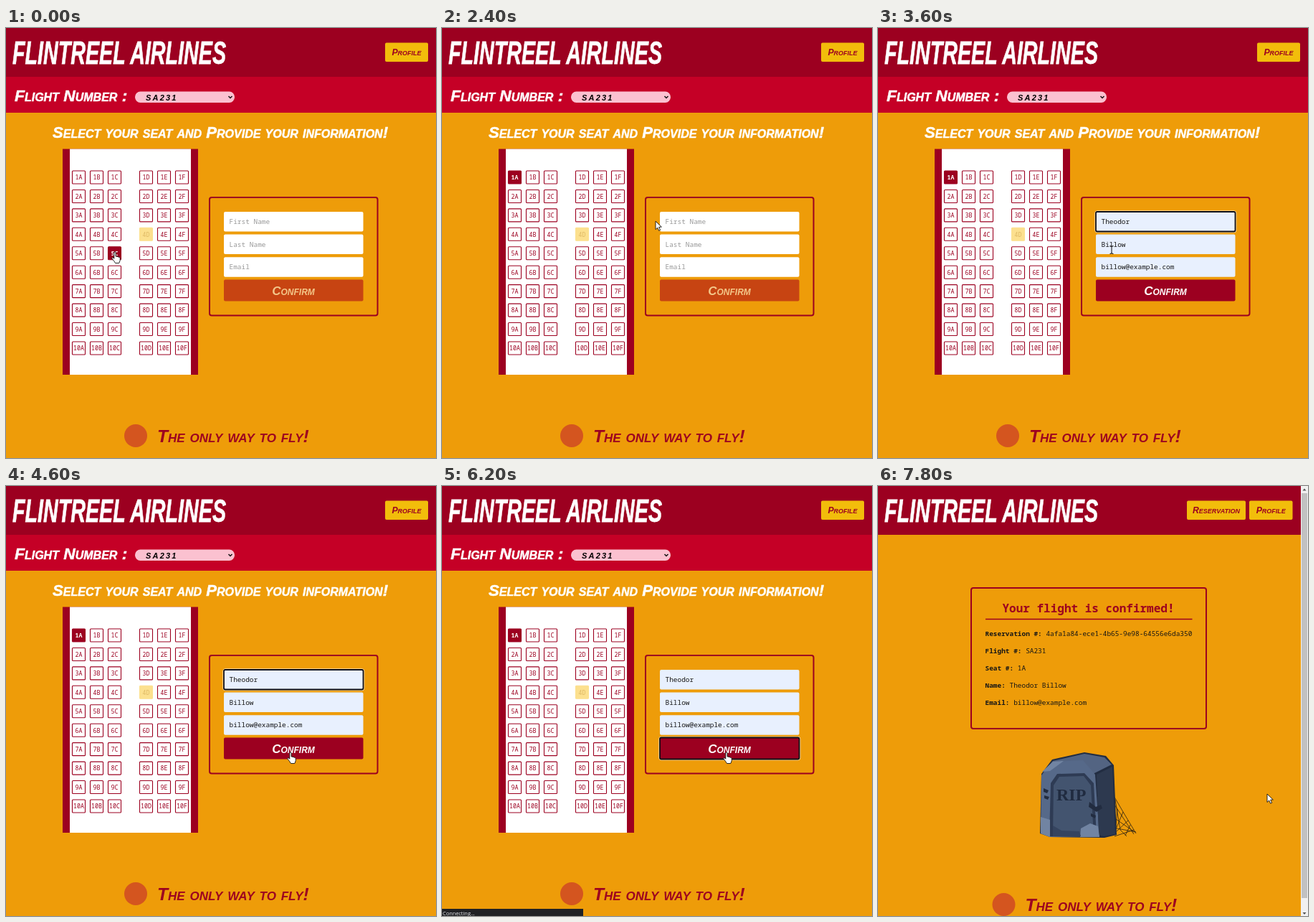
An HTML page for the animation above (8 s loop, 600 px wide and 599 px high).

```html
<!DOCTYPE html>
<html lang="en">
<head>
<meta charset="utf-8">
<title>Seat booking</title>
<style>
  html, body { margin: 0; width: 100%; height: 100%; overflow: hidden; background: #ee9c09; }
  svg { display: block; width: 100%; height: 100%; }
  text { white-space: pre; }
  .brush { font: italic bold 22px "Liberation Sans", Arial, sans-serif; font-variant: small-caps; }
  .white { fill: #fff; stroke: #fff; stroke-width: .5; }
  .red { fill: #9c0020; }
  .frame { fill: none; stroke: #9c0020; stroke-width: 2; }
  .mono { font: 9.45px "Noto Sans Mono", "Liberation Mono", monospace; fill: #161616; }
  .bold { font-weight: bold; }
  .mid { text-anchor: middle; }
  .menu { font: 7.4px "Open Sans", "Noto Sans", sans-serif; fill: #222; }
  .seat rect { fill: #fff; stroke: #9c0020; stroke-width: 1.1; }
  .seat text { font-size: 8.3px; fill: #9c0020; }
  .seat.on rect { fill: #9c0020; }
  .seat.on text { fill: #fff; font-weight: bold; }
  .seat.taken rect { fill: #fce08e; stroke: #fce08e; }
  .seat.taken text { fill: #dfb965; }
  .field rect { fill: #fff; }
  .field text { fill: #999; }
  .field.full rect { fill: #e8f0fe; }
  .field.full text { fill: #161616; }
  .ring { fill: none; stroke: #101018; stroke-width: 1.8; }
  .halo { fill: none; stroke: #fff; stroke-width: .7; }
  #confirm rect { fill: #c74412; }
  #confirm text { fill: #f3c78a; }
  #confirm.ready rect { fill: #9c0020; }
  #confirm.ready text { fill: #fff; }
  #cursor path { fill: #fff; stroke: #111; stroke-width: .9; stroke-linejoin: round; }
  #cursor #beam { fill: none; stroke: #222; stroke-width: 1.1; }
</style>
</head>
<body>
<svg viewBox="0 0 600 599" preserveAspectRatio="none">
  <rect width="600" height="599" fill="#ee9c09"/>
  <rect width="600" height="68" fill="#9c0020"/>
  <text class="brush white" transform="translate(9 50) scale(1 1.55)" style="font-size:28.7px">FLINTREEL AIRLINES</text>

  <g id="footer">
    <circle cx="181" cy="568" r="16" fill="#d4551f"/>
    <text class="brush red" x="211" y="577" style="font-size:24.6px">The only way to fly!</text>
  </g>

  <g id="booking">
    <rect y="68" width="600" height="50" fill="#c50026"/>
    <text class="brush white" x="12" y="102" style="font-size:22.8px">Flight Number :</text>
    <rect x="180" y="88.5" width="139" height="15.5" rx="7.5" fill="#fbc1d0"/>
    <text x="195" y="100.5" style="font:italic bold 11px 'Liberation Sans',Arial,sans-serif;letter-spacing:2.2px">SA231</text>
    <path d="M310.5 95l2.5 2.6 2.5-2.6" fill="none" stroke="#111" stroke-width="1.4"/>
    <text class="brush white mid" x="299" y="152.5" style="font-size:22.2px">Select your seat and Provide your information!</text>
    <rect x="79" y="168.500" width="189" height="314.500" fill="#9c0020"/>
    <rect x="89" y="168.500" width="169" height="314.500" fill="#fff"/>
    <g id="seats"></g>
    <rect class="frame" x="284" y="236" width="234.500" height="164.500" rx="3"/>
    <g id="fields"></g>
    <g id="confirm">
      <rect x="304" y="350.500" width="194.500" height="30" rx="2"/>
      <text class="brush mid" x="401" y="372" style="font-size:17px">Confirm</text>
    </g>
    <g id="nameFocus">
      <rect class="halo" x="302.800" y="254.800" width="197" height="30" rx="3"/>
      <rect class="ring" x="304" y="256" width="194.500" height="27.500" rx="2"/>
    </g>
    <path id="caret" d="M312.500 264v11" stroke="#111"/>
    <g id="confirmFocus">
      <rect class="halo" x="302.800" y="349.300" width="197" height="32.500" rx="3"/>
      <rect class="ring" x="304" y="350.500" width="194.500" height="30" rx="2"/>
    </g>
    <g id="dropdown">
      <rect x="303.500" y="286" width="195.500" height="108" rx="1" fill="#b97a0c"/>
      <rect x="304" y="285" width="194.500" height="108" rx="1" fill="#fff"/>
      <rect id="option" x="304" y="292" width="194.500" height="34" fill="#e8e8ea"/>
      <text class="menu bold" x="311" y="304">Theodor</text>
      <text class="menu" x="311" y="317.500">Theodor Billow</text>
      <text class="menu bold" x="311" y="340.500">Theodor</text>
      <text class="menu" x="311" y="354">Theodor Marsden</text>
      <path d="M304 367.500h194.500" stroke="#dcdfe3"/>
      <text class="menu" x="311" y="384" style="font-size:8px">Manage...</text>
    </g>
  </g>

  <g id="confirmed">
    <rect class="frame" x="130" y="142" width="328" height="196" rx="3"/>
    <text class="mono bold red mid" x="293.500" y="176" style="font-size:16px;fill:#9c0020">Your flight is confirmed!</text>
    <path d="M150 185.500h288.500" stroke="#9c0020" stroke-width="1.6"/>
    <g id="details"></g>
    <g id="tomb" stroke-linejoin="round">
      <g fill="none" stroke="#2b2114" stroke-width=".8">
        <path d="M328 430l14 24 18 30M330 444l27 41M329 462l29 20M328 476l32 6M330 488l27-9M331 437l7 42 9 9M334 450l-3 35M342 454l-11 26M349 466l-16 15M352 472l-7 15"/>
      </g>
      <path d="M228 401l15-20 45-10 30 5 11 13 4 97-17 4-76-1-14-5z" fill="#222d42"/>
      <path d="M230 400l14-17 44-10 28 5 10 10-26 13-10-11-40 2z" fill="#536482"/>
      <path d="M228 403l16-19 42-2 17 20 6 86-69 1-13-5z" fill="#566989"/>
      <path d="M305 402l22-11 4 94-16 3-7-2z" fill="#2d394f"/>
      <path d="M239 488l2-74 9-13 38-1 13 14 4 74z" fill="#2e3b54"/>
      <path d="M244 487l1-70 8-12 34-1 10 13 4 70z" fill="#43546f"/>
      <path d="M227 461l13 4v24l-13-5zM283 477l13-7 11 4 2 15h-27zM229 398l15-14 15-1-19 14z" fill="#7184a2"/>
      <path d="M244 473l12 7 25 1 2 7h-39z" fill="#35445f"/>
      <path d="M295 440l9 7 7-3 2 5-8 5-11-7zM297 456l7 3-1 4-6-3zM231 421l7 3-2 4-5-2zM232 431l7 2-2 4-5-2z" fill="#222c40"/>
      <text x="249" y="438" style="font:bold 24px 'Liberation Serif',Times,serif" fill="#202b40">RIP</text>
    </g>
    <rect x="590" width="10" height="599" fill="#f1f1f1"/>
    <rect x="591" y="10" width="8" height="564" fill="#c1c1c1"/>
    <path d="M592.500 6.500l2.500-3 2.500 3zM592.500 594l2.500 3 2.500-3z" fill="#555"/>
  </g>

  <g id="nav"></g>

  <g id="status">
    <rect y="589" width="197" height="10" fill="#202124"/>
    <text class="menu" x="1" y="598" style="fill:#e8eaed">Connecting...</text>
  </g>

  <g id="cursor">
    <path id="arrow" d="M0 0v11.500l2.700-2.500 1.900 4.200 2-.9-1.900-4.100 3.600-.2z"/>
    <path id="hand" d="M-1.200 1c0-1.600 2.300-1.600 2.300 0v5l1.600.2 1.700.5 1.600.6 1.200 1.200v3.300l-1.400 3.700h-5.300l-2-3.200-2.700-3.200c-.4-1.500 1.200-1.800 2-.9l1 1z"/>
    <path id="beam" d="M-2.500-5.500q2.500 0 2.500 1.500v8q0 1.500-2.500 1.500M2.500-5.500q-2.500 0-2.500 1.500M0 4q0 1.500 2.500 1.500"/>
  </g>
</svg>
<script>
const LOOP = 8000, STEP = 200;
const $ = id => document.getElementById(id);
const show = (id, on) => $(id).style.display = on ? '' : 'none';

// Seats
const columns = { A: 92, B: 117, C: 142, D: 186, E: 211, F: 236 };
const seats = [];
for (let row = 1; row <= 10; row++) {
  for (const [letter, x] of Object.entries(columns)) {
    const y = 199 + (row - 1) * 26.44, name = row + letter;
    const taken = name === '4D';
    $('seats').insertAdjacentHTML('beforeend',
      `<g class="seat ${taken ? 'taken' : ''}"><rect x="${x + .5}" y="${y}" width="18" height="18" rx="1"/>
       <text class="mono mid" x="${x + 9.5}" y="${y + 12.3}">${name}</text></g>`);
    seats.push({ x, y, name, taken, node: $('seats').lastElementChild });
  }
}

// Form fields
const fields = [['First Name', 'Theodor'], ['Last Name', 'Billow'], ['Email', 'billow@example.com']]
  .map(([hint, value], i) => {
    const y = 256 + i * 31.6;
    $('fields').insertAdjacentHTML('beforeend',
      `<g class="field"><rect x="304" y="${y}" width="194.5" height="27.500" rx="2"/>
       <text class="mono" x="311.500" y="${y + 17}"></text></g>`);
    const node = $('fields').lastElementChild;
    return { hint, value, node, label: node.querySelector('text') };
  });

// Reservation details
[['Reservation #:', '4afa1a84-ece1-4b65-9e98-64556e6da350'], ['Flight #:', 'SA231'], ['Seat #:', '1A'],
 ['Name:', 'Theodor Billow'], ['Email:', 'billow@example.com']].forEach(([label, value], i) =>
  $('details').insertAdjacentHTML('beforeend',
    `<text class="mono" x="149.500" y="${208.5 + i * 24}"><tspan class="bold">${label}</tspan> ${value}</text>`));

const button = (id, label, x, width) => $('nav').insertAdjacentHTML('beforeend',
  `<g id="${id}"><rect x="${x}" y="20.500" width="${width}" height="26.500" rx="2" fill="#f2bd0b"/>
   <text class="brush red mid" x="${x + width / 2}" y="38" style="font-size:12.300px">${label}</text></g>`);
button('profileWide', 'Profile', 529, 60);
button('reservation', 'Reservation', 431, 82);
button('profileNarrow', 'Profile', 518, 60.5);

// Pointer stops: time, x, y
const stops = [
  [0, 152, 312], [1200, 100, 210], [1600, 100, 210], [2600, 321, 276], [3000, 321, 276],
  [3400, 326, 309], [3800, 326, 309], [4600, 397, 371], [6600, 397, 371],
  [7400, 588, 415], [7800, 543, 429], [8000, 543, 429]
];
function pointerAt(t) {
  const i = Math.max(1, stops.findIndex(s => s[0] > t));
  const [t0, x0, y0] = stops[i - 1], [t1, x1, y1] = stops[i];
  const u = (t - t0) / (t1 - t0), e = u * u * (3 - 2 * u);
  return [x0 + (x1 - x0) * e, y0 + (y1 - y0) * e];
}
const inside = (px, py, x, y, w, h) => px >= x && px <= x + w && py >= y && py <= y + h;

function render(t) {
  const done = t >= 6400, menu = t >= 2800 && t < 3600, filled = t >= 3600;
  const [px, py] = pointerAt(t);
  let shape = 'arrow';

  for (const seat of seats) {
    const hover = !done && !seat.taken && inside(px, py, seat.x, seat.y, 19, 19);
    if (hover) shape = 'hand';
    seat.node.classList.toggle('on', hover || (seat.name === '1A' && t >= 1600));
  }
  fields.forEach(({ hint, value, node, label }, i) => {
    node.classList.toggle('full', filled);
    label.textContent = filled ? value : hint;
    const covered = menu && i > 0;
    if (!done && !covered && inside(px, py, 304, 256 + i * 31.6, 194, 27.5)) shape = 'beam';
  });
  if (!done && filled && inside(px, py, 304, 350, 194, 31)) shape = 'hand';

  $('confirm').classList.toggle('ready', filled);
  show('booking', !done);
  show('confirmed', done);
  show('profileWide', !done);
  show('reservation', done);
  show('profileNarrow', done);
  show('dropdown', menu);
  show('option', menu && py > 292);
  show('nameFocus', t >= 2600 && t < 5600);
  show('caret', t >= 2600 && t < 3200);
  show('confirmFocus', t >= 5600);
  show('status', t >= 5800 && t < 6800);
  $('footer').setAttribute('transform', done ? 'translate(-5.500 15)' : '');

  for (const id of ['arrow', 'hand', 'beam']) show(id, id === shape);
  show('cursor', t < 7400 || t >= 7800);
  $('cursor').setAttribute('transform', `translate(${px} ${py})`);
}

const start = performance.now();
function tick() {
  const t = (performance.now() - start) % LOOP;
  render(Math.floor(t / STEP) * STEP);
  requestAnimationFrame(tick);
}
tick();
</script>
</body>
</html>
```
